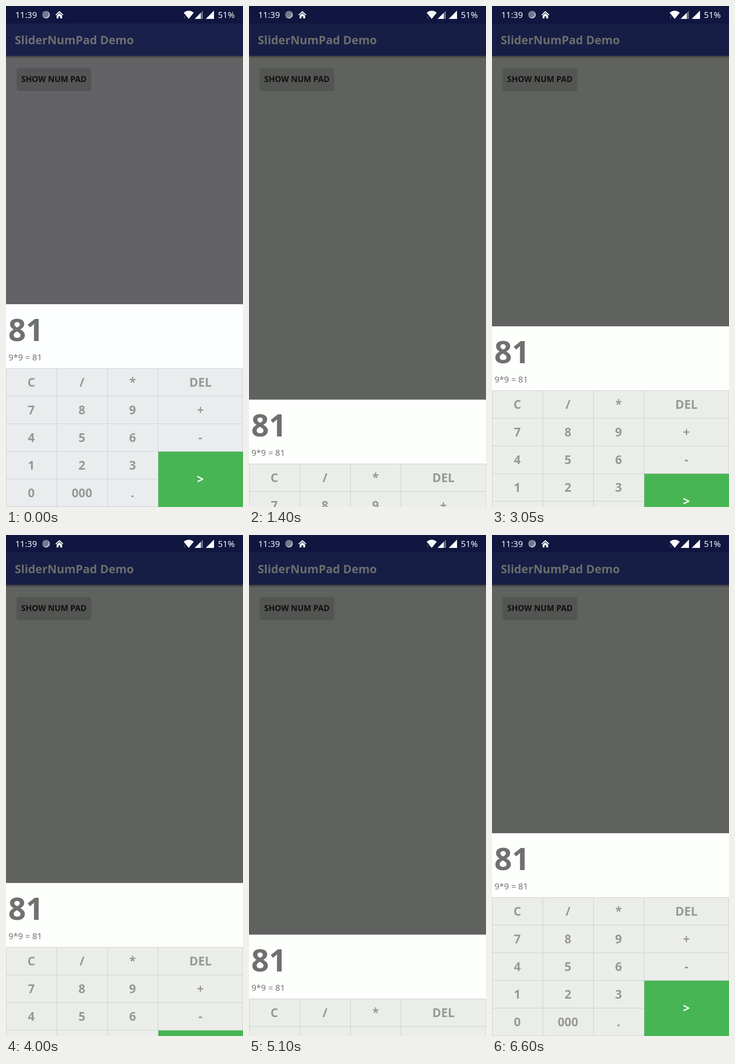
Animation of 515x1087 px, one loop 6800 ms. Source, as an HTML page with a canvas:

```html
<!DOCTYPE html>
<html lang="en">
<head>
<meta charset="utf-8">
<title>SliderNumPad Demo</title>
<style>
  html, body { margin: 0; width: 100%; height: 100%; overflow: hidden; background: #60625f; }
  canvas { display: block; width: 515px; height: 1087px; }
</style>
</head>
<body>
<canvas id="stage"></canvas>
<script>
const W = 515, H = 1087, LOOP = 6800, STEP = 50;
const FONT = '"Noto Sans", "Open Sans", sans-serif';
const canvas = document.getElementById('stage');
const ctx = canvas.getContext('2d');
const ratio = window.devicePixelRatio || 1;
canvas.width = W * ratio;
canvas.height = H * ratio;
ctx.scale(ratio, ratio);

// Sheet's top edge: [time in ms, y]
const path = [
  [0, 647], [850, 647], [1400, 854], [2000, 974], [2200, 974], [2250, 971],
  [3050, 695], [3200, 647], [3500, 647], [4000, 755], [4650, 960],
  [4750, 960], [5100, 867], [5450, 647], [LOOP, 647]
];

const cool = { bar: '#10163f', head: '#192049', back: '#636264', button: '#555456',
  title: '#6d7072', sheet: '#fdfeff', key: '#ebecee', line: '#cdcecf' };
const warm = { bar: '#10163f', head: '#161e45', back: '#60625f', button: '#535552',
  title: '#6b6e6b', sheet: '#fdfffc', key: '#ebedea', line: '#cccecb' };

const columns = [0, 110, 220, 330, 515];
const keys = [
  ['C', '/', '*', 'DEL'],
  ['7', '8', '9', '+'],
  ['4', '5', '6', '-'],
  ['1', '2', '3'],
  ['0', '000', '.']
];

// Smooth interpolation that never overshoots its points
function slope(i) {
  if (i === 0 || i === path.length - 1) return 0;
  const [[t0, y0], [t1, y1], [t2, y2]] = path.slice(i - 1, i + 2);
  const a = (y1 - y0) / (t1 - t0), b = (y2 - y1) / (t2 - t1);
  return a * b <= 0 ? 0 : 2 * a * b / (a + b);
}

function sheetTop(t) {
  let i = 0;
  while (i < path.length - 2 && t >= path[i + 1][0]) i++;
  const [t0, y0] = path[i], [t1, y1] = path[i + 1];
  const d = t1 - t0, u = (t - t0) / d, v = 1 - u;
  return y0 * (1 + 2 * u) * v * v + slope(i) * d * u * v * v
    + y1 * u * u * (3 - 2 * u) - slope(i + 1) * d * u * u * v;
}

function rect(x, y, w, h, color) {
  ctx.fillStyle = color;
  ctx.fillRect(x, y, w, h);
}

function poly(points, color) {
  ctx.beginPath();
  points.forEach(([x, y]) => ctx.lineTo(x, y));
  ctx.closePath();
  ctx.fillStyle = color;
  ctx.fill();
}

function disc(x, y, r, color) {
  ctx.beginPath();
  ctx.arc(x, y, r, 0, Math.PI * 2);
  ctx.fillStyle = color;
  ctx.fill();
}

function text(str, x, y, size, color, weight = 400, align = 'left') {
  ctx.font = `${weight} ${size}px ${FONT}`;
  ctx.textAlign = align;
  ctx.fillStyle = color;
  ctx.fillText(str, x, y);
}

function moon() {
  disc(87, 19, 8.2, '#b9bcc8');
  ctx.save();
  ctx.beginPath();
  ctx.arc(87, 19, 8.2, 0, Math.PI * 2);
  ctx.clip();
  disc(85.3, 17.6, 7.4, '#74788f');
  ctx.restore();
}

function house() {
  poly([[116, 11], [124.5, 18.7], [123, 20.3], [116, 14], [109, 20.3], [107.5, 18.7]], '#fff');
  poly([[116, 15.5], [122, 21], [122, 27], [118, 27], [118, 22.5],
    [114, 22.5], [114, 27], [110, 27], [110, 21]], '#fff');
}

function wifi() {
  ctx.beginPath();
  ctx.moveTo(397, 28);
  ctx.lineTo(386, 14.5);
  ctx.quadraticCurveTo(397, 6, 408, 14.5);
  ctx.closePath();
  ctx.fillStyle = '#fff';
  ctx.fill();
  rect(387, 22, 2, 2, '#555a78');
  rect(387, 25, 2, 2, '#555a78');
}

function statusBar(c, t) {
  rect(0, 0, W, 38, c.bar);
  text('11:39', 20, 26, 18.5, '#f4f5f8');
  moon();
  house();
  wifi();
  const full = t >= 6400;
  poly([[410, 28], [428, 10], [428, 28]], full ? '#fff' : '#666b86');
  if (!full) poly([[410, 28], [423, 15], [423, 28]], '#fff');
  poly([[434, 28], [452, 10], [452, 28]], '#fff');
  text('51%', 460.5, 26, 18.5, '#f4f5f8');
}

function page(c) {
  rect(0, 38, W, H - 38, c.back);
  const shade = ctx.createLinearGradient(0, 108, 0, 114);
  shade.addColorStop(0, 'rgba(0,0,0,.38)');
  shade.addColorStop(1, 'rgba(0,0,0,0)');
  rect(0, 108, W, 6, shade);
  rect(0, 38, W, 70, c.head);
  text('SliderNumPad Demo', 19, 83, 25, c.title, 600);

  ctx.save();
  ctx.shadowColor = 'rgba(0,0,0,.3)';
  ctx.shadowBlur = 3 * ratio;
  ctx.shadowOffsetY = ratio;
  ctx.beginPath();
  ctx.roundRect(24, 135, 160, 47, 3);
  ctx.fillStyle = c.button;
  ctx.fill();
  ctx.restore();
  text('SHOW NUM PAD', 104, 165, 17.5, '#0f100f', 600, 'center');
}

function sheet(c, top) {
  ctx.save();
  ctx.translate(0, top);
  rect(0, 0, W, 440, c.sheet);
  text('81', 5, 80, 67, '#6f716f', 700);
  text('9*9 = 81', 5.5, 122, 18.5, '#757775');

  rect(0, 139, W, 301, c.key);
  for (let row = 0; row < 6; row++) rect(0, 139 + row * 60, W, 1, c.line);
  for (const x of columns) rect(Math.min(x, W - 1), 139, 1, 301, c.line);
  keys.forEach((row, r) => row.forEach((label, k) => {
    const x = (columns[k] + columns[k + 1]) / 2;
    text(label, x, 179 + r * 60, 26, '#979997', 600, 'center');
  }));
  rect(331, 320, 184, 120, '#48b554');
  text('>', 422.5, 389, 26, '#fff', 600, 'center');
  ctx.restore();
}

function draw(now) {
  const t = Math.floor((now % LOOP) / STEP) * STEP;
  const colors = t < 550 ? cool : warm;
  page(colors);
  statusBar(colors, t);
  sheet(colors, Math.round(sheetTop(t)));
}

let start;
function tick(now) {
  start ??= now;
  draw(now - start);
  requestAnimationFrame(tick);
}
draw(0);
requestAnimationFrame(tick);
</script>
</body>
</html>
```
